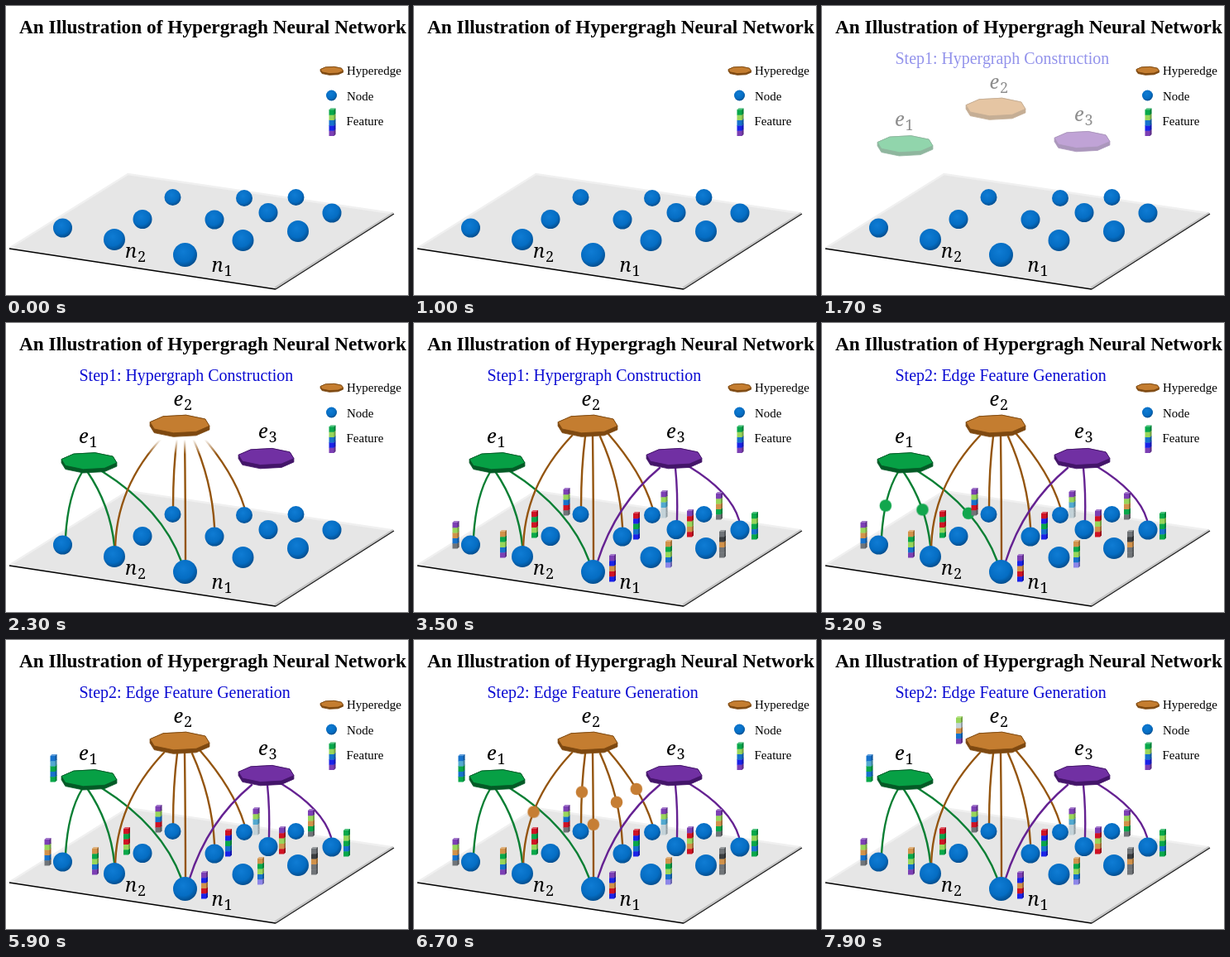
An HTML page for the animation above (8000 ms loop, 486 by 349 pixels).

```html
<!DOCTYPE html>
<html lang="en">
<head>
<meta charset="utf-8">
<title>Hypergraph neural network</title>
<style>
html, body { margin: 0; width: 100%; height: 100%; overflow: hidden; background: #fff; }
svg { display: block; width: 486px; height: 349px; font-family: "Liberation Serif", "Times New Roman", serif; }
.title { font-size: 23.3px; font-weight: bold; }
.step { font-size: 19.95px; fill: #0a0ad2; }
.legend { font-size: 15px; }
.sym { font-family: "Noto Serif", serif; font-size: 23.5px; font-style: italic; }
.sub { font-family: "Noto Serif", serif; font-size: 18px; }
.wire { fill: none; stroke-width: 2.4; stroke-linecap: round; }
.ball { offset-rotate: 0deg; opacity: 0; }
</style>
</head>
<body>
<svg id="stage" viewBox="0 0 486 349" xmlns="http://www.w3.org/2000/svg"></svg>
<script>
const LOOP = 8000;
const css = [];
const pct = ms => (ms / LOOP * 100).toFixed(3) + '%';
const play = name => `style="animation:${name} ${LOOP}ms linear infinite both"`;

// Keyframe builders, times in ms
function ramp(name, from, to, a, b) {
  css.push(`@keyframes ${name}{0%,${pct(a)}{${from}}${pct(b)},100%{${to}}}`);
}
const fadeIn = (name, a, b) => ramp(name, 'opacity:0', 'opacity:1', a, b);
const fadeOut = (name, a, b) => ramp(name, 'opacity:1', 'opacity:0', a, b);
function travel(name, a, b) {
  css.push(`@keyframes ${name}{0%,${pct(a - 1)}{opacity:0;offset-distance:0%}
    ${pct(a)}{opacity:1;offset-distance:0%;animation-timing-function:ease-in-out}
    ${pct(b)}{opacity:1;offset-distance:100%}${pct(b + 1)},100%{opacity:0;offset-distance:100%}}`);
}

fadeIn('build', 1500, 1950);
fadeIn('features', 2700, 3050);
fadeOut('step1out', 4150, 4350);
fadeIn('step2in', 4350, 4600);
fadeIn('feat1', 5560, 5860);
fadeIn('feat2', 7060, 7360);

const edges = [
  { x: 100.5, y: 166.7, s: .95, top: '#07a045', side: '#045a26', wire: '#0a7f34', ball: '#12a64d',
    wipe: [1950, 2130, 290, 150], go: [4900, 5530],
    paths: ['M72 258Q75 208 92 180', 'M131 269Q126 220 98 179', 'M212 288Q189 225 116 179'] },
  { x: 210, y: 122, s: 1.02, top: '#c47d30', side: '#7d4810', wire: '#94550f', ball: '#c67e34',
    wipe: [2130, 2350, 300, 110], go: [6400, 7040],
    paths: ['M132 276Q132 198 191 136', 'M202 222Q202 176 207 137', 'M217 293Q217 212 216 137',
            'M252 246Q249 190 225 137', 'M288 222Q275 180 235 134'] },
  { x: 314.5, y: 161.5, s: .95, top: '#7130a3', side: '#431569', wire: '#652292',
    wipe: [2350, 2560, 300, 150],
    paths: ['M222 288Q244 219 297 175', 'M318 238Q319 205 316 175', 'M393 238Q383 204 332 173'] }
];

function plate(x, y, s, top, side) {
  const d = 4.5 * s;
  const v = [...Array(8)].map((_, k) => {
    const a = (k * 45 + 12) * Math.PI / 180;
    return [x + 36 * s * Math.cos(a), y + 10.8 * s * Math.sin(a)];
  });
  const low = v.map(p => [p[0], p[1] + d]);
  const hull = [v[4], v[5], v[6], v[7], v[0], ...low.slice(0, 5)];
  return `<polygon points="${hull.join(' ')}" fill="${side}" stroke="${side}" stroke-width=".8"/>
    <polygon points="${v.join(' ')}" fill="${top}" stroke="${side}" stroke-width=".8"/>`;
}

const ink = { p: '#7c3fb4', g: '#08a84a', l: '#98d65a', o: '#d2924a', b: '#1672cc', n: '#1a22e8', r: '#d01224',
              k: '#707478', d: '#3a3d40', w: '#c3d2d8', c: '#52a9d0', v: '#8d86e8' };
function stack(x, y, code) {
  return [...code].map((c, i) => {
    const t = y + 2 + i * 6.3, f = ink[c];
    return `<path d="M${x} ${t}l2-2h6v6.3l-2 2h-6z" fill="${f}"/>
      <path d="M${x + 6} ${t}l2-2v6.3l-2 2z" fill="#000" opacity=".25"/>
      <path d="M${x} ${t}l2-2h6l-2 2z" fill="#fff" opacity=".3"/>`;
  }).reverse().join('');
}

const node = ([x, y, r]) => `<circle cx="${x}" cy="${y}" r="${r}" fill="url(#ball)"/>`;
const text = (cls, x, y, s, extra = '') => `<text class="${cls}" x="${x}" y="${y}" ${extra}>${s}</text>`;
const label = (ch, n, x, y) => text('sym', x, y, ch) + text('sub', x + (ch === 'n' ? 15 : 12.5), y + 5, n);

const nodes = [[201.5, 231, 10], [288, 232, 10], [350.5, 231, 10], [317, 249.5, 11.5], [394, 250, 11.5],
  [165, 257.5, 11.5], [252, 258, 11.5], [68.5, 268, 11.5], [353, 272, 13], [131, 282, 13],
  [286.5, 283, 13], [216.5, 300.5, 14.5]];

const feats = [[46.5, 239, 'plobk'], [104, 250, 'oglbp'], [142, 226, 'rgrlg'], [180.5, 199, 'plbrk'],
  [236, 279, 'pnorn'], [265, 228, 'rngbn'], [298.500, 202, 'plcww'], [330, 225, 'prlor'],
  [365, 204, 'plogk'], [304, 262, 'oglbv'], [369, 250, 'kdokk'], [408, 228, 'glgbg']];

const masks = edges.map((e, i) => {
  const [a, b, y0, y1] = e.wipe;
  ramp('wipe' + i, `transform:translateY(${y0}px)`, `transform:translateY(${y1 - 15}px)`, a, b);
  return `<mask id="m${i}" maskUnits="userSpaceOnUse" x="0" y="0" width="486" height="349">
    <rect width="486" height="400" fill="url(#soft)" ${play('wipe' + i)}/></mask>`;
}).join('');

const wires = edges.map((e, i) => `<g mask="url(#m${i})">` +
  e.paths.map(d => `<path class="wire" d="${d}" stroke="${e.wire}"/>`).join('') + '</g>').join('');

const balls = edges.map((e, i) => {
  if (!e.go) return '';
  travel('go' + i, ...e.go);
  return e.paths.map(d => `<circle class="ball" r="7.3" fill="${e.ball}"
    style="offset-path:path('${d}');animation:go${i} ${LOOP}ms linear infinite"/>`).join('');
}).join('');

const plates = edges.map(e => plate(e.x, e.y, e.s, e.top, e.side)).join('');

document.getElementById('stage').innerHTML = `
  <defs>
    <radialGradient id="ball" cx=".42" cy=".36" r=".66">
      <stop offset="0" stop-color="#0f7cd4"/><stop offset=".65" stop-color="#056dc3"/>
      <stop offset="1" stop-color="#034c8c"/>
    </radialGradient>
    <linearGradient id="soft" x1="0" y1="0" x2="0" y2="1">
      <stop offset="0" stop-color="#fff" stop-opacity="0"/><stop offset=".045" stop-color="#fff"/>
    </linearGradient>
    ${masks}
  </defs>
  <polygon points="4,293 147,203 469,250.5 326,341.5" fill="#e6e6e6"/>
  <path d="M4 292.5L147.5 203L469 250.5" fill="none" stroke="#f0f0f0" stroke-width="2.5"/>
  <path d="M325 340.5L468 250" stroke="#c4c4c4" stroke-width="2.5"/>
  <path d="M326 342L469 251" stroke="#1a1a1a" stroke-width="1.2"/>
  <path d="M4 293L326 342" stroke="#000" stroke-width="1.5"/>
  ${wires}${balls}
  ${nodes.map(node).join('')}
  <g ${play('features')}>${feats.map(f => stack(...f)).join('')}</g>
  <g ${play('build')}>
    ${plates}
    ${label('e', 1, 88, 145)}${label('e', 2, 202.5, 100)}${label('e', 3, 305, 139)}
    ${text('step', 88.5, 70, 'Step1: Hypergraph Construction', play('step1out'))}
  </g>
  ${text('step', 88.5, 70, 'Step2: Edge Feature Generation', play('step2in'))}
  <g ${play('feat1')}>${stack(53.5, 138, 'bcgbg')}</g>
  <g ${play('feat2')}>${stack(162, 92, 'lwobp')}</g>
  ${label('n', 2, 144, 304)}${label('n', 1, 248.5, 321)}
  ${text('title', 16, 33, 'An Illustration of Hypergragh Neural Network')}
  ${plate(393.8, 77.5, .39, '#c47d30', '#7d4810')}
  ${node([393.5, 108, 6.5])}
  ${stack(390.5, 123.5, 'glbnp')}
  ${text('legend', 412, 83, 'Hyperedge')}${text('legend', 412, 114, 'Node')}${text('legend', 411.5, 144, 'Feature')}
`;
const sheet = document.createElement('style');
sheet.textContent = css.join('\n');
document.head.append(sheet);
</script>
</body>
</html>
```
